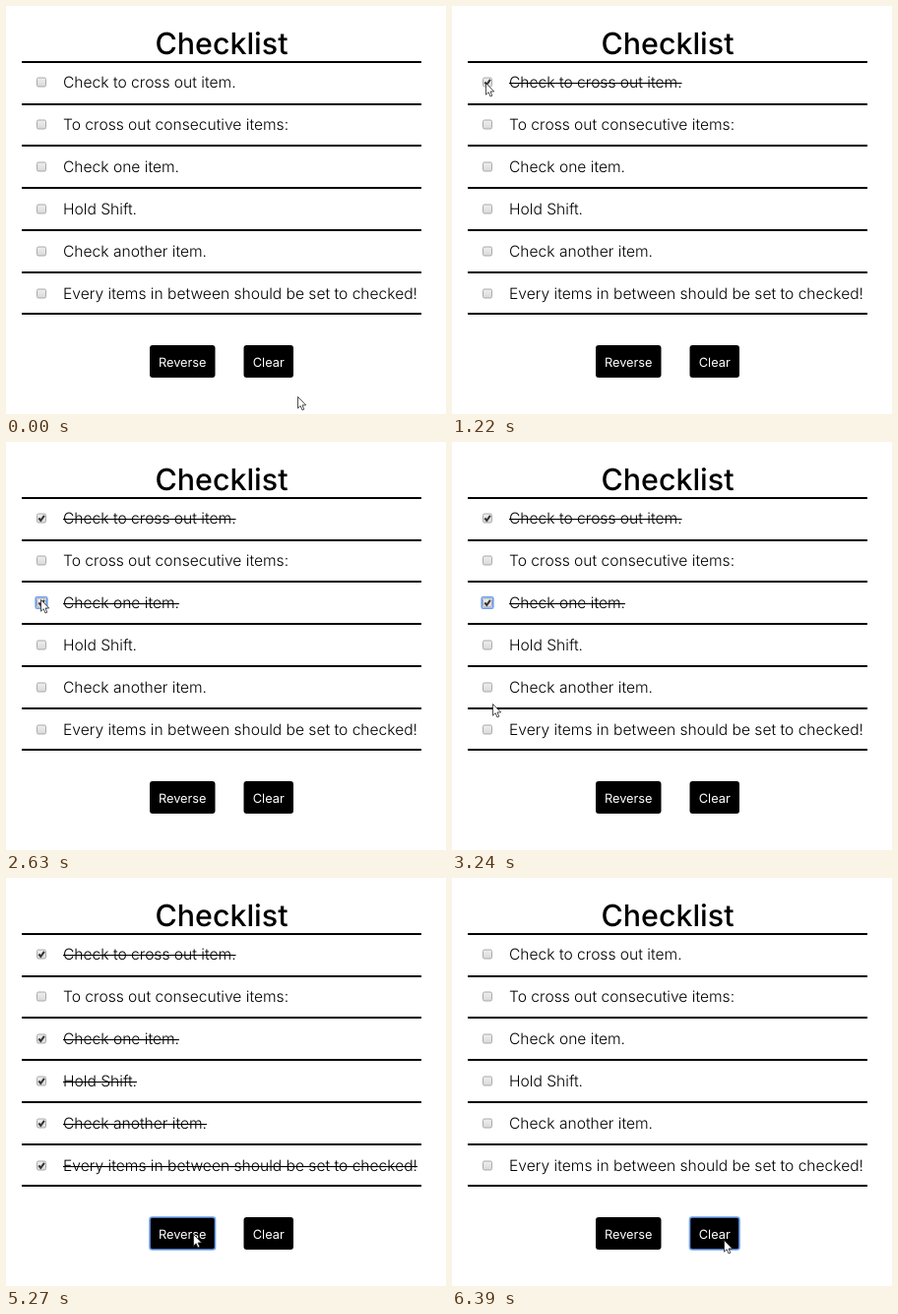
An HTML page that plays this animation: 447x415 px, repeating every 6.46 s.

```html
<!DOCTYPE html>
<html lang="en">
<head>
<meta charset="utf-8">
<title>Checklist</title>
<style>
html, body { margin: 0; width: 100%; height: 100%; overflow: hidden; background: #fff; }
svg { display: block; font-family: Inter, "Open Sans", sans-serif; text-rendering: geometricPrecision; }
.item { font-size: 15.6px; font-weight: 300; }
.button { font-size: 12.8px; fill: #fff; text-anchor: middle; }
.ring { fill: none; stroke: #6d9df0; stroke-width: 1.6; }
</style>
</head>
<body>
<svg id="stage" width="447" height="415" viewBox="0 0 447 415">
  <defs>
    <linearGradient id="box" x2="0" y2="1">
      <stop stop-color="#efefef"/><stop offset="1" stop-color="#d9d9d9"/>
    </linearGradient>
  </defs>
  <text x="219" y="49" font-size="30.4" font-weight="500" text-anchor="middle">Checklist</text>
</svg>
<script>
const LOOP = 6460, TICK = 74;
const stage = document.getElementById('stage');
const labels = ['Check to cross out item.', 'To cross out consecutive items:', 'Check one item.',
  'Hold Shift.', 'Check another item.', 'Every items in between should be set to checked!'];

function add(tag, attrs, text = '') {
  const node = document.createElementNS(stage.namespaceURI, tag);
  for (const key in attrs) node.setAttribute(key, attrs[key]);
  node.textContent = text;
  return stage.appendChild(node);
}
const show = (node, on) => node.setAttribute('visibility', on ? 'visible' : 'hidden');
const rect = (x, y, width, height, more) => add('rect', { x, y, width, height, ...more });

const rings = {};
for (let i = 0; i <= labels.length; i++) rect(16, Math.floor(56.2 + 42.8 * i), 406, 2);

const marks = labels.map((label, i) => {
  const y = 77.5 + 43 * i;
  rect(31.5, y - 4.5, 9, 9, { rx: 1.5, fill: 'url(#box)', stroke: '#aaa' });
  rings[i] = rect(30.2, y - 5.8, 11.6, 11.6, { rx: 1.5, class: 'ring' });
  const text = add('text', { x: 58, y: y + 5.5, class: 'item' }, label);
  return [
    add('path', { d: `M33.3 ${y}l2 2.3 3.6-5`, fill: 'none', stroke: '#333', 'stroke-width': 2 }),
    rect(58, y + .5, text.getComputedTextLength(), 1.1)
  ];
});

function addButton(label, x, width) {
  rect(x, 345, width, 33, { rx: 3 });
  rings[label] = rect(x, 345, width, 33, { rx: 2.5, class: 'ring' });
  add('text', { x: x + width / 2, y: 366.6, class: 'button' }, label);
}
addButton('Reverse', 146, 66.5);
addButton('Clear', 241.5, 50.5);

const cursor = add('path', {
  d: 'M.5 .5V12.2L3.1 9.7 5 14 6.8 13.2 5 9H8.7Z', fill: '#fff', stroke: '#222', 'stroke-width': .8
});

const check = (from, to = from) => items => items.map((on, i) => on || i >= from && i <= to);
const reverse = items => items.map(on => !on);
const clear = items => items.map(() => false);

// A press moves the focus ring, the release changes the list
const clicks = [
  { release: 1220, change: check(0) },
  { press: 2460, release: 2630, control: 2, change: check(2) },
  { press: 4020, release: 4090, control: 5, change: check(2, 5) },
  { press: 5200, release: 5350, control: 'Reverse', change: reverse },
  { press: 6230, release: 6390, control: 'Clear', change: clear }
];

// Each leg starts where the one before it ended; bow bends it sideways
const legs = [
  { start: 70, end: 570, to: [43, 82], bow: -133 },
  { start: 660, end: 1060, to: [36, 74] },
  { start: 1220, end: 1760, to: [33, 173], bow: -11 },
  { start: 1910, end: 1980, to: [35, 160] },
  { start: 2700, end: 3240, to: [41, 266] },
  { start: 3310, end: 3710, to: [36, 290] },
  { start: 4290, end: 5030, to: [190, 362] },
  { start: 5420, end: 5840, to: [276, 368] }
];

function cursorAt(t) {
  let [x, y] = [296, 397];
  for (const { start, end, to, bow = 0 } of legs) {
    if (t < start) break;
    const steps = Math.round((end - start) / TICK);
    const step = Math.floor((t - start) / (end - start) * steps + .01) + 1;
    const p = Math.min(1, step / (steps + 1));
    const ease = p * p * (3 - 2 * p);
    x += (to[0] - x) * ease + bow * Math.sin(Math.PI * ease);
    y += (to[1] - y) * ease;
  }
  return [Math.round(x), Math.round(y)];
}

function draw(t) {
  const items = clicks.filter(c => c.release <= t)
    .reduce((list, c) => c.change(list), labels.map(() => false));
  const focus = clicks.filter(c => c.press <= t).pop()?.control;
  marks.forEach((pair, i) => pair.forEach(node => show(node, items[i])));
  for (const key in rings) show(rings[key], key === String(focus));
  cursor.setAttribute('transform', `translate(${cursorAt(t)})`);
}

const begin = performance.now();
function tick() {
  draw((performance.now() - begin) % LOOP);
  requestAnimationFrame(tick);
}
tick();
</script>
</body>
</html>
```
